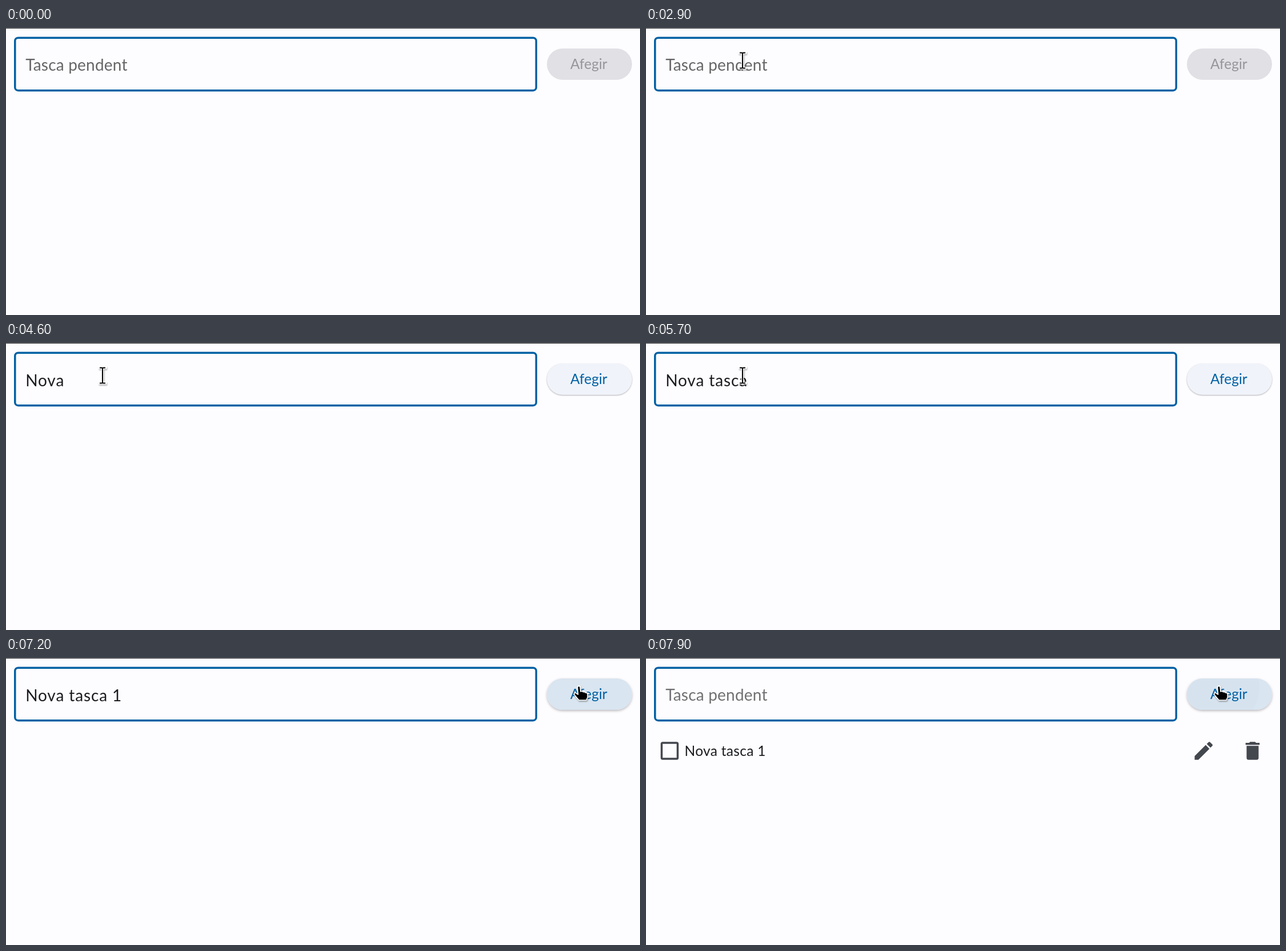
These frames come from a looping animation (1110 by 504 pixels, 8 s). An HTML page:

```html
<!DOCTYPE html>
<html lang="ca">
<head>
<meta charset="utf-8">
<title>Llista de tasques</title>
<style>
  html, body { margin: 0; width: 100%; height: 100%; overflow: hidden; background: #fdfcff; }
  svg { display: block; width: 100vw; height: 100vh; }
  text { font-family: Lato, "Noto Sans", sans-serif; white-space: pre; }
  .input { font-size: 28px; fill: #1a1c1e; letter-spacing: .875px; }
  .hint { font-size: 28px; letter-spacing: .2px; }
  .label { font-size: 24.5px; }
  .item { font-size: 24.5px; fill: #1a1c1e; letter-spacing: .3px; }
</style>
</head>
<body>
<svg viewBox="0 0 1110 504">
  <defs>
    <clipPath id="pill"><rect x="947" y="36" width="149" height="55" rx="27.5"/></clipPath>
  </defs>
  <rect width="1110" height="504" fill="#fdfcff"/>
  <rect width="1110" height="1" fill="#333"/>

  <rect id="border" fill="none"/>
  <text id="hint" class="hint" x="34.2" y="75">Tasca pendent</text>
  <text id="typed" class="input" x="34.2" y="76"></text>
  <rect id="caret" y="41" width="3.5" height="41" fill="#0061a4"/>

  <g id="disabled">
    <rect x="947" y="36" width="149" height="55" rx="27.5" fill="#e1e0e4"/>
    <text class="label" x="988" y="72" fill="#969599">Afegir</text>
  </g>
  <g id="enabled">
    <rect id="face" x="947" y="36" width="149" height="55" rx="27.5" fill="#f0f3fa"/>
    <g clip-path="url(#pill)">
      <rect id="hover" x="947" y="36" width="149" height="55" fill="#d9e5f0"/>
      <circle id="ripple" cx="1003" cy="52" fill="#0061a4"/>
    </g>
    <text class="label" x="988" y="72" fill="#0061a4">Afegir</text>
  </g>

  <g id="task">
    <rect x="27.4" y="148.9" width="28" height="28" rx="1.75" fill="none" stroke="#43474e" stroke-width="3.5"/>
    <text class="item" x="67.5" y="171.5">Nova tasca 1</text>
    <g fill="#43474e">
      <path transform="translate(955.3 142) scale(1.75)" d="M3 17.25V21h3.75L17.81 9.94l-3.75-3.75zM20.71 7.04a1 1 0 0 0 0-1.41l-2.34-2.34a1 1 0 0 0-1.41 0l-1.83 1.83 3.75 3.75z"/>
      <path transform="translate(1041 142) scale(1.75)" d="M6 19a2 2 0 0 0 2 2h8a2 2 0 0 0 2-2V7H6zM19 4h-3.5l-1-1h-5l-1 1H5v2h14z"/>
    </g>
  </g>

  <g id="pointer" style="filter:drop-shadow(1px 2px 1px rgba(0,0,0,.3))" stroke-linejoin="round">
    <g id="beam" fill="none">
      <path d="M-5-13.5h3.5q1.5 0 1.5 1.5V12q0 1.5-1.5 1.5H-5M5-13.5H1.5Q0-13.5 0-12V12q0 1.5 1.5 1.5H5" stroke="#fff" stroke-width="4.4" stroke-linecap="square"/>
      <path d="M-5-13.5h3.5q1.5 0 1.5 1.5V12q0 1.5-1.5 1.5H-5M5-13.5H1.5Q0-13.5 0-12V12q0 1.5 1.5 1.5H5" stroke="#000" stroke-width="2"/>
    </g>
    <path id="arrow" d="M0 0V22l5-5 4 8 4-2-4-8h7z" stroke="#fff" stroke-width="1.6"/>
    <path id="hand" d="M-2.5 1.5Q-2-.8 0-.8T2.3 1.5L3 9q2.5-1.8 4.3.6 2.5-1 4 1.2 3-.6 4 2.4V19L13 24H0l-8-9.5q-1-3.5 2-3.5l4.5 3z" stroke="#fff" stroke-width="1.7"/>
  </g>
</svg>
<script>
const LOOP = 8000, STEP = 100;
const el = Object.fromEntries([...document.querySelectorAll('[id]')].map(n => [n.id, n]));

const set = (node, attrs) => {
  for (const name in attrs) node.setAttribute(name, attrs[name]);
};
const show = (node, on) => set(node, { visibility: on ? 'visible' : 'hidden' });

// Linear interpolation through [time, value] pairs.
function track(keys, t) {
  if (t <= keys[0][0]) return keys[0][1];
  for (let i = 1; i < keys.length; i++) {
    const [t0, a] = keys[i - 1], [t1, b] = keys[i];
    if (t < t1) return a + (b - a) * (t - t0) / (t1 - t0);
  }
  return keys[keys.length - 1][1];
}

const TEXT = 'Nova tasca 1';
const STROKES = [3500, 3700, 3900, 4000, 4100, 4700, 4800, 5000, 5100, 5200, 6000, 6300];
const SUBMIT = 7600;

const POINTER_X = [[2400, 206], [2500, 194], [2600, 178], [2700, 169], [6600, 169], [6700, 235],
  [6800, 520], [6900, 850], [7000, 1095], [7100, 1020], [7200, 1003]];
const POINTER_Y = [[2400, 4], [2500, 27], [2600, 47], [2700, 57], [6600, 57], [6700, 50],
  [6800, 31], [6900, 38], [7000, 48], [7100, 51], [7200, 50]];

function caretOn(t) {
  if (t < STROKES[0]) return Math.floor((t + 100) / 500) % 2 === 1;
  if (t >= 7400) return t < 7500;
  const last = STROKES.filter(s => s <= t).pop();
  return Math.floor((t - last) / 500) % 2 === 0 && t < 6800;
}

function drawField(t) {
  const count = t < SUBMIT ? STROKES.filter(s => s <= t).length : 0;
  el.typed.textContent = TEXT.slice(0, count);
  const fade = t < SUBMIT ? 1 : track([[7600, .2], [7700, .5], [7900, .93]], t);
  set(el.hint, { 'fill-opacity': .6 * fade });
  show(el.hint, count === 0);
  show(el.caret, caretOn(t));
  set(el.caret, { x: 34.2 + (count ? el.typed.getComputedTextLength() : 0) });

  const focus = track([[7400, 1], [7500, .4], [7600, .4], [7700, 1]], t);
  const w = 1.75 + 1.75 * focus;
  set(el.border, {
    x: 14 + w / 2, y: 15.4 + w / 2, width: 916 - w, height: 96 - w, rx: 5.5, 'stroke-width': w,
    stroke: `rgb(${115 * (1 - focus)},${97 + 22 * (1 - focus)},${164 - 37 * (1 - focus)})`
  });
}

function drawButton(t) {
  const enabled = track([[3400, 0], [3700, 1]], t);
  const hover = track([[6900, 0], [7200, 1]], t);
  set(el.disabled, { opacity: enabled < 1 ? 1 : 0 });
  set(el.enabled, { opacity: enabled });
  set(el.hover, { opacity: hover });
  el.face.style.filter =
    `drop-shadow(0 ${1.3 + hover}px ${1 + hover}px rgba(0,0,0,${.3 - .04 * hover}))`;
  set(el.ripple, {
    r: track([[7300, 0], [7400, 20], [7700, 71]], t),
    opacity: track([[7300, 0], [7400, .08], [7600, .08], [7900, .012]], t)
  });
}

function drawPointer(t) {
  const x = track(POINTER_X, t), y = track(POINTER_Y, t);
  const overField = x < 930 && y > 15, overButton = x > 947;
  set(el.pointer, { transform: `translate(${x} ${y})` });
  const visible = t >= 2400;
  show(el.beam, visible && overField);
  show(el.hand, visible && overButton);
  show(el.arrow, visible && !overField && !overButton);
}

function render(now) {
  const t = Math.floor((now % LOOP) / STEP) * STEP;
  drawField(t);
  drawButton(t);
  drawPointer(t);
  show(el.task, t >= SUBMIT);
}

const start = performance.now();
function tick() {
  render(performance.now() - start);
  requestAnimationFrame(tick);
}
tick();
</script>
</body>
</html>
```
